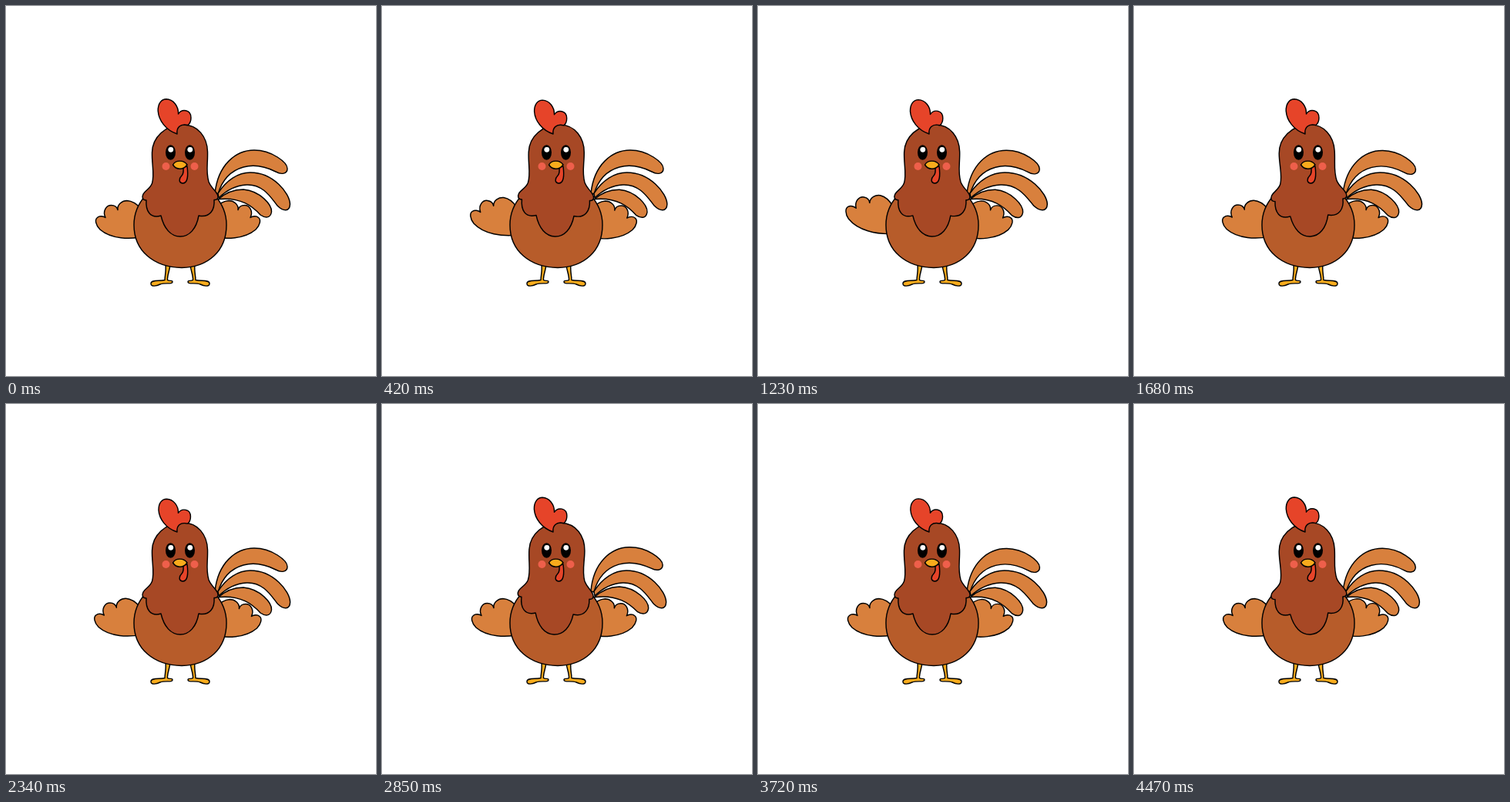
Recreate the animation shown at these times as an HTML page without scripts. Size 480x480 px, loop 4.5 s.

```html
<!DOCTYPE html>
<html lang="en">
<head>
<meta charset="utf-8">
<title>Rooster</title>
<style>
  @property --turn { syntax: "<angle>"; inherits: false; initial-value: 0deg; }
  @property --dx { syntax: "<length>"; inherits: false; initial-value: 0px; }
  @property --dy { syntax: "<length>"; inherits: false; initial-value: 0px; }
  @property --sx { syntax: "<number>"; inherits: false; initial-value: 1; }
  @property --sy { syntax: "<number>"; inherits: false; initial-value: 1; }

  html, body { margin: 0; width: 100%; height: 100%; overflow: hidden; background: #fff; }
  svg { display: block; width: 100%; height: 100%; }

  .ink { stroke: #000; stroke-width: 1.45; stroke-linejoin: round; }
  .tan { fill: #d8803d; }
  .red { fill: #e64429; }
  .yellow { fill: #f8ab1c; }
  .cheek { fill: #ee5f4b; }

  /* Animating the variables keeps the outlines sharp while parts move. */
  .move {
    transform: translate(var(--dx), var(--dy)) rotate(var(--turn)) scale(var(--sx), var(--sy));
    animation: 4500ms ease-in-out infinite;
  }
  .neck { animation-name: sway; transform-origin: 226px 225px; }
  .comb { animation-name: squash; transform-origin: 222px 166px; }
  .wave { animation-name: wave; transform-origin: 195px 259px; }
  .drift { animation-name: drift; }
  .top { animation-name: lift; transform-origin: 274px 246px; }
  .mid { animation-name: stretch; transform-origin: 276px 248px; }
  .low { animation-name: dip; transform-origin: 277px 250px; }

  @keyframes sway {
    0%, 52%, 82.67% { --turn: 0deg; }
    18%, 63.33% { --turn: 2.3deg; }
    37.33%, 99.33%, 100% { --turn: -2.1deg; }
  }
  @keyframes squash {
    0%, 34.67%, 69.33% { --sx: 1; --sy: 1; }
    17.33%, 52%, 86.67% { --sx: .97; --sy: .945; }
    100% { --sx: .996; --sy: .992; }
  }
  @keyframes drift {
    0%, 34.67%, 69.33% { --dx: 0px; --dy: 0px; }
    17.33%, 52%, 86.67% { --dx: 1.4px; --dy: 1px; }
    100% { --dx: .2px; --dy: .1px; }
  }
  @keyframes wave {
    0%, 12%, 23.11%, 63.33%, 82.67% { --turn: 0deg; --dx: 0px; }
    6%, 18%, 30%, 44.67%, 57.78%, 72.89%, 91.11% { --turn: 15deg; --dx: 0px; }
    37.33%, 52% { --turn: .4deg; --dx: -1.6px; }
    99.33%, 100% { --turn: 0deg; --dx: -.8px; }
  }
  @keyframes lift {
    0%, 18%, 52% { --turn: 0deg; }
    37.33%, 82.67% { --turn: .7deg; }
    63.33% { --turn: -1.4deg; }
    100% { --turn: .4deg; }
  }
  @keyframes stretch {
    0%, 60% { --sx: 1; }
    30%, 90% { --sx: 1.075; }
    50% { --sx: 1.002; }
    100% { --sx: 1.02; }
  }
  @keyframes dip {
    0%, 52% { --turn: 0deg; --sx: 1; }
    18%, 37.33%, 82.67%, 100% { --turn: .6deg; --sx: .99; }
    63.33% { --turn: -1.8deg; --sx: 1.01; }
  }
</style>
</head>
<body>
<svg viewBox="0 0 480 480">
  <defs>
    <path id="wing" d="M184 298C160 304 136 302 122 290C116 284 115 277 118.500 274.500C121 272 126 272.500 129 274.500C125 266 130 258.500 136.500 258.500C141 258.500 144 261 145 264.500C144 257 151 252.500 157 252.500C165 253 170 257 175 263L195 275Z"/>
    <path id="leg" d="M207 336C208 344 206 350 206 355.500C198 357 188 355 188 360C188 365 196 363 200 361C206 358.500 216 361.500 216 358C216 355 212 357.500 209.500 355.500C209 350 212 344 213 336Z"/>
    <g id="eye">
      <ellipse cx="213.500" cy="190" rx="6.500" ry="9.800"/>
      <circle cx="213.800" cy="186.300" r="3.400" fill="#fff"/>
    </g>
  </defs>

  <g class="ink tan">
    <path class="move top" d="M271 243C275 206 298 187 322 187C345 187 365 203 365 211C365 218 357 219 350 215C334 207 319 206 308 209C290 214 280 227 275 244Z"/>
    <path class="move mid" d="M275 243C286 226 301 216 317 216C347 216 368 243 368.500 257C368 268 359 266 352 259C344 249 334 231 312 232C297 233 285 240 276 249Z"/>
    <path class="move low" d="M275 251C285 242 297 238 308 238C330 240 345 258 344.500 267C343 276 336 275 330 271C320 260 305 248 277 250.500Z"/>
    <use class="move wave" href="#wing"/>
    <g class="move drift"><use href="#wing" transform="translate(446) scale(-1 1)"/></g>
  </g>

  <g class="ink yellow">
    <use href="#leg"/>
    <use href="#leg" transform="translate(452) scale(-1 1)"/>
  </g>

  <path class="ink" fill="#b75c2a" d="M181 246C170 258 166 271 166 284C166 318 192 339 228 339.500C262 339 286 318 286 284C286 269 281 257 271 246Z"/>
  <path class="ink move neck" fill="#a74825" d="M230 154C249 154 261 170 261.500 189C262 204 259 215 263 228C266 236 272 239 274.500 245C276 249 274 252 270 251.500C271 264 265 275 250 272C247 289 238 299 226 299C214 299 205 289 201 272C187 276 181 266 182 252C177 252 176 248 178 244C181 239 187 237 189.500 230C193 218 189 206 189.500 190C190 170 207 154 230 154Z"/>
  <path class="ink red move comb" d="M222 166C207 161 198 148 197.200 136C197 126 202 120.700 208 120.700C217 121 224 130 223.500 140C228 133 240 134 240 145C240 150 238 153 236 154.500C226 152 221 158 222 166Z"/>

  <g class="cheek">
    <circle cx="207.500" cy="208" r="5"/>
    <circle cx="244.500" cy="208" r="5"/>
  </g>
  <use href="#eye"/>
  <use href="#eye" x="25"/>
  <path class="ink red" d="M235 208C236.500 220 236 230 229 230C224 229 224 224 228 220C231 217 230 213 230 209Z"/>
  <path class="ink yellow" d="M216.500 206C220 199.500 231 199.500 235 206C230 213 221 213 216.500 206Z"/>
</svg>
</body>
</html>
```
